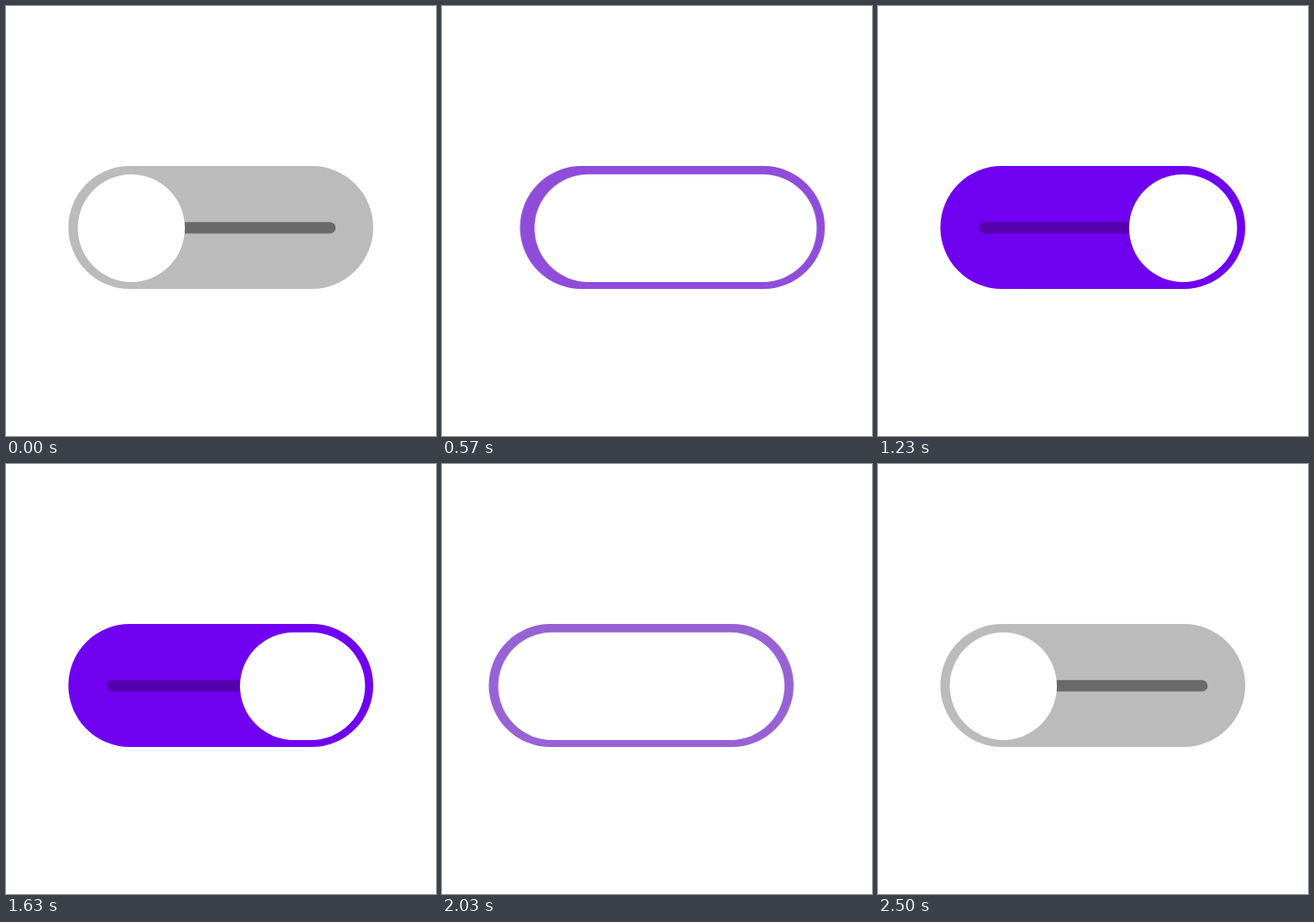
These frames come from a looping animation (500x500 px, 3.03 s). An HTML page:

```html
<!DOCTYPE html>
<html lang="en">
<head>
<meta charset="utf-8">
<title>Toggle switch</title>
<style>
  html, body {
    margin: 0;
    width: 100%;
    height: 100%;
    overflow: hidden;
    background: #fff;
  }
  svg {
    display: block;
    width: 500px;
    height: 500px;
  }
  .switch, .track, .groove, .knob {
    --soft: cubic-bezier(.333, 0, .667, 1);
    animation: 3030ms var(--soft) infinite;
  }
  .switch { animation-name: recoil; }
  .track { animation-name: track; }
  .groove { animation-name: groove; }
  .knob {
    fill: #fff;
    animation-name: stretch;
    animation-timing-function: cubic-bezier(.5, 0, .5, 1);
  }

  /* the whole switch is pushed along when the knob hits a wall */
  @keyframes recoil {
    0%, 14.45%, 31%, 62.64%, 76.92%, 100% { transform: translateX(0); }
    22.16% { transform: translateX(30px); }
    70.33% { transform: translateX(-30px); }
  }

  /* the leading edge goes first, the trailing edge follows */
  @keyframes stretch {
    0%, 81.98%, 100% { x: 83.5px; width: 124.5px; }
    16.2%, 16.67% { x: 83.5px; width: 334px; }
    32.6%, 50% { x: 292px; width: 125.5px; }
    66.04% { x: 83.5px; width: 334px; }
  }

  @keyframes track {
    0%, 5.5%, 76.37%, 100% { fill: #bbb; }
    29.35%, 57.14% { fill: #7000f0; }
  }
  @keyframes groove {
    0%, 5.5%, 76.37%, 100% { fill: #6a6a6a; }
    29.35%, 57.14% { fill: #5400ac; }
  }
</style>
</head>
<body>
<svg viewBox="0 0 500 500">
  <g class="switch">
    <rect class="track" x="72.5" y="186" width="354.5" height="143" rx="71.5"/>
    <rect class="groove" x="117" y="251.3" width="266.3" height="13.2" rx="6.6"/>
    <rect class="knob" x="83.5" y="195.7" width="124.5" height="125.2" rx="62.6"/>
  </g>
</svg>
</body>
</html>
```
